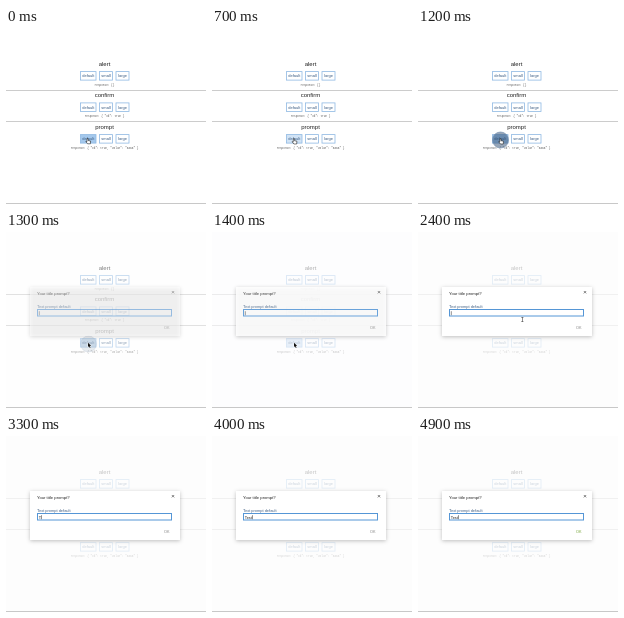
These frames come from a looping animation (200x176 px, 5 s). An HTML page with a canvas:

```html
<!DOCTYPE html>
<html lang="en">
<head>
<meta charset="utf-8">
<title>Prompt dialog</title>
<style>
html, body { margin: 0; width: 100%; height: 100%; overflow: hidden; background: #fff; }
canvas { display: block; }
</style>
</head>
<body>
<canvas id="stage" width="200" height="176"></canvas>
<script>
const ctx = document.getElementById('stage').getContext('2d');
const SANS = '"Liberation Sans", Arial, sans-serif';
const MONO = '"Liberation Mono", monospace';
const LOOP = 5000, STEP = 100;

const clamp = v => Math.max(0, Math.min(1, v));
const easeOut = p => 1 - (1 - clamp(p)) ** 3;

function text(str, x, y, size, color, align = 'left', family = SANS, weight = 400) {
  ctx.font = `${weight} ${size}px ${family}`;
  ctx.textAlign = align;
  ctx.textBaseline = 'alphabetic';
  ctx.fillStyle = color;
  ctx.fillText(str, x, y);
}

function rect(x, y, w, h, color) {
  ctx.fillStyle = color;
  ctx.fillRect(x, y, w, h);
}

function button(label, x, y, w, fill) {
  rect(x, y, w, 8.5, fill);
  ctx.strokeStyle = '#8fb9e3';
  ctx.lineWidth = 0.8;
  ctx.strokeRect(x, y, w, 8.5);
  text(label, x + w / 2, y + 5.6, 4, '#35577f', 'center');
}

function section(title, top, response, hover) {
  text(title, 98.5, top + 5, 6, '#222', 'center');
  button('default', 74.5, top + 10.6, 15.5, `rgba(164,200,236,${hover})`);
  button('small', 93.5, top + 10.6, 13, '#fff');
  button('large', 110, top + 10.6, 13, '#fff');
  text(response, 98.5, top + 25, 2.76, '#555', 'center', MONO);
}

function page(hover) {
  rect(0, 0, 200, 176, '#fff');
  section('alert', 33, 'response: {}', 0);
  section('confirm', 64.3, 'response: { "ok": true }', 0);
  section('prompt', 96, 'response: { "ok": true, "value": "aaaa" }', hover);
  rect(0, 62, 200, 1, '#ccc');
  rect(0, 93, 200, 1, '#ccc');
}

function clickRing(alpha) {
  ctx.save();
  ctx.globalAlpha = alpha;
  ctx.beginPath();
  ctx.arc(82.5, 112, 8, 0, Math.PI * 2);
  ctx.fillStyle = 'rgba(45,75,112,.5)';
  ctx.fill();
  ctx.lineWidth = 1;
  ctx.strokeStyle = 'rgba(125,150,180,.7)';
  ctx.stroke();
  ctx.restore();
}

function dialog(alpha, t) {
  ctx.save();
  ctx.globalAlpha = alpha;
  rect(0, 0, 200, 175, 'rgba(252,252,253,.75)');
  ctx.shadowColor = 'rgba(0,0,0,.25)';
  ctx.shadowBlur = 4;
  ctx.shadowOffsetY = 1;
  rect(24, 55, 150, 49, '#fff');
  ctx.shadowColor = 'transparent';

  text('Your title prompt?', 31, 62.5, 4.2, '#222');
  text('Text prompt default', 31, 76, 3.95, '#3d5c80');
  ctx.lineWidth = 0.6;
  ctx.strokeStyle = '#333';
  ctx.beginPath();
  ctx.moveTo(165.8, 59); ctx.lineTo(168.2, 61.4);
  ctx.moveTo(168.2, 59); ctx.lineTo(165.8, 61.4);
  ctx.stroke();

  ctx.lineWidth = 1;
  ctx.strokeStyle = '#5596d6';
  ctx.strokeRect(31.5, 77.5, 134, 6.5);

  const typed = 'Test'.slice(0, [3300, 3400, 3600, 3900].filter(k => t >= k).length);
  text(typed, 32.7, 82.7, 3.9, '#222');
  const typing = t >= 3300 && t < 4400;
  const blinkOn = t < 3300 ? Math.floor((t - 1300) / 500) % 2 === 0 : t >= 4900;
  if (typing || blinkOn) rect(32.9 + ctx.measureText(typed).width, 79.2, 0.5, 4, '#222');

  text('OK', 160.8, 97.4, 3.8, t >= 4200 ? '#77a63c' : '#888', 'center');
  ctx.restore();
}

function outline(points, x, y) {
  ctx.beginPath();
  points.forEach(([dx, dy]) => ctx.lineTo(x + dx, y + dy));
  ctx.closePath();
}

function arrow(x, y) {
  outline([[0, 0], [0, 4.4], [1, 3.5], [1.8, 5.2], [2.6, 4.8], [1.8, 3.2], [3.1, 3.1]], x, y);
  ctx.strokeStyle = '#fff';
  ctx.lineWidth = 0.8;
  ctx.stroke();
  ctx.fillStyle = '#111';
  ctx.fill();
}

function hand(x, y) {
  outline([[0, 0], [1, 0], [1.1, 2], [3.6, 2.5], [3.4, 5.3], [.6, 5.3], [-1.2, 3], [0, 3.1]], x, y);
  ctx.fillStyle = '#fff';
  ctx.fill();
  ctx.strokeStyle = '#222';
  ctx.lineWidth = 0.6;
  ctx.stroke();
}

function beam(x, y) {
  rect(x, y, 0.6, 5, '#444');
  rect(x - 0.9, y, 2.4, 0.5, '#444');
  rect(x - 0.9, y + 4.5, 2.4, 0.5, '#444');
}

// Pointer stops: time, x, y
const PATH = [
  [0, 81, 110.5], [100, 77, 112], [200, 66, 113], [300, 59, 110],
  [400, 59, 110], [500, 62, 110], [600, 75, 111], [700, 81.3, 110.7],
  [1300, 82, 110.7], [1700, 82, 110.7], [1800, 83, 108], [2000, 87.6, 95.5],
  [2300, 104, 85], [3300, 104.3, 85]
];

function pointer(t) {
  if (t >= 3300) return;
  const i = PATH.findIndex(p => p[0] > t);
  const [t0, x0, y0] = PATH[i - 1], [t1, x1, y1] = PATH[i];
  const p = (t - t0) / (t1 - t0);
  const x = x0 + (x1 - x0) * p, y = y0 + (y1 - y0) * p;
  if (t >= 2300) beam(x, y);
  else if (t < 1300 && x >= 74) hand(x, y);
  else arrow(x, y);
}

function hoverLevel(t) {
  if (t < 500) return 1 - clamp((t - 100) / 200);
  if (t < 1300) return clamp((t - 500) / 400);
  return t < 1800 ? 0.7 : 0;
}

function draw(now) {
  const t = Math.floor((now % LOOP) / STEP) * STEP;
  page(hoverLevel(t));
  if (t >= 1200 && t < 1400) clickRing(t < 1300 ? 1 : 0.4);
  if (t > 1200) dialog(easeOut((t - 1200) / 400), t);
  rect(0, 175, 200, 1, '#c8c8c8');
  pointer(t);
}

const start = performance.now();
function tick() {
  draw(performance.now() - start);
  requestAnimationFrame(tick);
}
tick();
</script>
</body>
</html>
```
